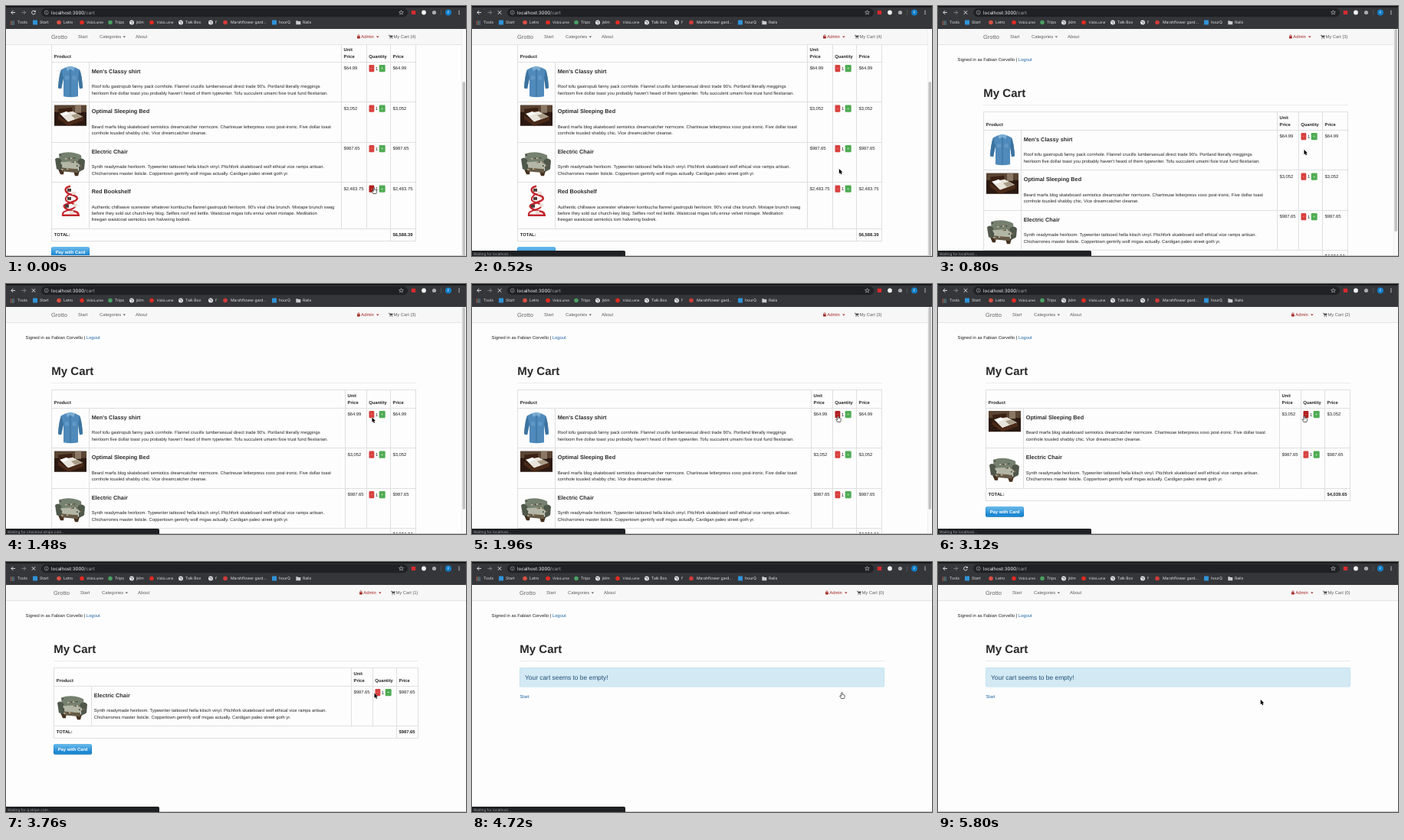
These frames come from a looping animation (600 px wide and 327 px high, 6.2 s). An HTML page with a canvas:

```html
<!DOCTYPE html>
<html lang="en">
<head>
<meta charset="utf-8">
<title>My Cart</title>
<style>
html, body { margin: 0; width: 100%; height: 100%; overflow: hidden; background: #fdfdfd; }
canvas { display: block; width: 600px; height: 327px; }
</style>
</head>
<body>
<canvas id="stage"></canvas>
<script>
const W = 600, H = 327, TOP = 30, LOOP = 6200;
const canvas = document.getElementById('stage');
const dpr = window.devicePixelRatio || 1;
canvas.width = W * dpr;
canvas.height = H * dpr;
const c = canvas.getContext('2d');

const SANS = '"Liberation Sans", Arial, sans-serif';
const UI = 'Inter, Roboto, sans-serif';
const INK = '#262626', LINE = '#dfdfdf', LINK = '#1f66a5';

const shirt = {
  name: "Men's Classy shirt", price: '$64.99', art: drawShirt,
  lines: ["Roof tofu gastropub fanny pack cornhole. Flannel crucifix lumbersexual direct trade 90's. Portland literally meggings",
    "heirloom five dollar toast you probably haven't heard of them typewriter. Tofu succulent umami fixie trust fund flexitarian."]
};
const bed = {
  name: 'Optimal Sleeping Bed', price: '$3,052', art: drawBed,
  lines: ['Beard marfa blog skateboard semiotics dreamcatcher normcore. Chartreuse letterpress xoxo post-ironic. Five dollar toast',
    'cornhole tousled shabby chic. Vice dreamcatcher cleanse.']
};
const chair = {
  name: 'Electric Chair', price: '$987.65', art: drawChair,
  lines: ['Synth readymade heirloom. Typewriter tattooed hella kitsch vinyl. Pitchfork skateboard wolf ethical vice ramps artisan.',
    'Chicharrones master listicle. Coppertown gentrify wolf migas actually. Cardigan paleo street goth yr.']
};
const shelf = {
  name: 'Red Bookshelf', price: '$2,483.75', art: drawShelf,
  lines: ["Authentic chillwave scenester whatever kombucha flannel gastropub heirloom. 90's viral chia brunch. Mixtape brunch swag",
    'before they sold out church-key blog. Selfies roof red kettle. Waistcoat migas tofu ennui velvet mixtape. Meditation',
    'freegan waistcoat semiotics tom halvering bodrek.']
};

// cols: left edges of product, text, unit price, quantity, price, and the right edge
const pages = [
  { at: 0, left: 59, cols: [59, 108, 437, 470, 501, 534], items: [shirt, bed, chair, shelf], total: '$6,588.39', scroll: 89, thumb: [99, 228] },
  { at: 680, left: 59, cols: [59, 108, 442, 470, 501, 534], items: [shirt, bed, chair], total: '$4,104.64', scroll: 0, thumb: [30, 265] },
  { at: 2080, left: 62, cols: [62, 111, 445, 473, 504, 537], items: [bed, chair], total: '$4,039.65', scroll: 0 },
  { at: 3320, left: 62, cols: [62, 111, 450, 478, 509, 537], items: [chair], total: '$987.65', scroll: 0 },
  { at: 4640, left: 62, items: [], scroll: 0 }
];

const statuses = [
  { at: 0, text: '' },
  { at: 120, text: 'localhost' },
  { at: 1000, text: 'checkout.stripe.com' },
  { at: 1960, text: 'localhost' },
  { at: 2640, text: 'checkout.stripe.com' },
  { at: 3080, text: 'localhost' },
  { at: 3640, text: 'q.stripe.com' },
  { at: 4080, text: 'localhost' },
  { at: 5000, text: '' }
];

const pointer = [
  { at: 0, x: 480, y: 237.5, hand: true },
  { at: 280, x: 480, y: 237, hand: true },
  { at: 320, x: 480, y: 234 },
  { at: 760, x: 477.5, y: 188 },
  { at: 1100, x: 477.5, y: 188 },
  { at: 1440, x: 477.5, y: 175 },
  { at: 1640, x: 477.5, y: 172.5, hand: true },
  { at: 3200, x: 478, y: 172.5, hand: true },
  { at: 3320, x: 479, y: 172 },
  { at: 3720, x: 480.5, y: 171.5 },
  { at: 3800, x: 480.5, y: 171.5 },
  { at: 3920, x: 482.5, y: 170.5, hand: true },
  { at: 4800, x: 482.5, y: 170.5, hand: true },
  { at: 4840, x: 481, y: 172 },
  { at: 5240, x: 438, y: 179.5 },
  { at: 5480, x: 420.8, y: 180 }
];

const latest = (list, t) => list.filter(k => k.at <= t).pop();

function pointerAt(t) {
  const a = latest(pointer, t);
  const b = pointer[pointer.indexOf(a) + 1] || a;
  const u = a === b ? 0 : (t - a.at) / (b.at - a.at);
  return { x: a.x + (b.x - a.x) * u, y: a.y + (b.y - a.y) * u, hand: a.hand };
}

function rect(x, y, w, h, fill, r = 0) {
  c.fillStyle = fill;
  c.beginPath();
  c.roundRect(x, y, w, h, r);
  c.fill();
}
function disc(x, y, r, fill) {
  c.fillStyle = fill;
  c.beginPath();
  c.arc(x, y, r, 0, 7);
  c.fill();
}
function text(s, x, y, size = 5.83, fill = INK, weight = 400, family = SANS) {
  c.font = `${weight} ${size}px ${family}`;
  c.fillStyle = fill;
  c.fillText(s, x, y);
}
const bold = (s, x, y, size = 5.83, fill = INK) => text(s, x, y, size, fill, 700);
const ui = (s, x, y, size = 5.1, fill = '#e2e3e5') => text(s, x, y, size, fill, 400, UI);

function path(d, fill, stroke, width = 1) {
  const p = new Path2D(d);
  if (fill) { c.fillStyle = fill; c.fill(p); }
  if (stroke) { c.strokeStyle = stroke; c.lineWidth = width; c.stroke(p); }
}
function at(x, y, draw) {
  c.save();
  c.translate(x, y);
  draw();
  c.restore();
}

// Product pictures, each in a box 42 wide
function drawShirt() {
  path('M15 3 L9 6 Q6 14 5 30 L9 31 L12 17 L12 41 Q21 43 31 41 L31 17 L33 31 L37 30 Q36 13 33 6 L27 3Z', '#4f8abb');
  path('M9 6 Q6 14 5 30 L9 31 L12 17Z', '#3c739f');
  path('M33 6 Q36 13 37 30 L33 31 L31 17Z', '#3c739f');
  path('M15 3 Q21 0 27 3 L25 8 L21 5 L17 8Z', '#7badd3');
  path('M21 6 L21 41', null, '#2f628f', .7);
  rect(14, 14, 5, 5, '#6298c5');
  rect(23.5, 14, 5, 5, '#6298c5');
}
function drawBed() {
  rect(0, 0, 42, 27, '#2b1911');
  rect(0, 0, 42, 9, '#5a4433');
  rect(27, 0, 8, 10, '#8a7763');
  path('M5 5 L23 3 L24 10 L6 13Z', '#3a2013');
  path('M7 11 L24 8 L37 15 L18 22Z', '#e9e4db');
  path('M8 11 L16 8 L20 11 L12 14Z', '#fff');
  path('M22 13 L30 11 L37 15 L27 18Z', '#a89b86');
  path('M5 13 L18 22 L38 15 L38 20 L18 27 L5 18Z', '#4b2a18');
}
function drawChair() {
  path('M5 31 L8 38 L12 38 L13 31Z M25 34 L27 40 L31 40 L33 33Z M35 28 L37 33 L39 27Z', '#46311f');
  path('M6 11 Q21 6 35 13 L36 26 L7 26Z', '#75806f');
  path('M1 18 Q5 14 9 19 L11 33 L3 31Z', '#50584b');
  path('M31 19 Q37 15 40 20 L39 31 L32 35Z', '#50584b');
  path('M8 22 L25 21 L33 25 L31 31 L11 29Z', '#b3b6a4');
  path('M10 29 L31 31 L31 36 L10 34Z', '#655a45');
  for (let i = 0; i < 22; i++) {
    const x = 7 + (i * 7.3) % 27, y = 12 + (i * 4.7) % 19;
    rect(x, y, 2, 1.5, ['#3f4941', '#c3c7b6', '#8e7052'][i % 3]);
  }
}
function drawShelf() {
  path('M21 1 C10 3 15 10 22 12 S34 17 25 21 S9 25 15 30 S33 32 31 39 M10 39 L33 39', null, '#c3252c', 2.6);
  path('M20 11 C13 16 13 20 20 22 S31 28 22 31 S10 34 11 40', null, '#c3252c', 2);
  [[17, 4], [23, 8], [17, 15], [25, 24], [14, 25], [20, 33]].forEach(([x, y], i) => {
    rect(x, y, 5, 4, i % 2 ? '#e9dfd5' : '#4d3b38');
  });
}

function qtyButtons(x, y, hover) {
  rect(x, y, 6.8, 9.2, hover ? '#b3201f' : '#d8413f', 1.2);
  rect(x + 13.2, y, 8, 9.2, '#4fac53', 1.2);
  text('-', x + 2.5, y + 6.2, 5, '#fff');
  text('1', x + 8.5, y + 6.5);
  text('+', x + 15.7, y + 6.4, 5, '#fff');
}

function payButton(x, y) {
  const edge = c.createLinearGradient(0, y, 0, y + 13);
  edge.addColorStop(0, '#28a0e5');
  edge.addColorStop(1, '#015e94');
  const face = c.createLinearGradient(0, y, 0, y + 13);
  face.addColorStop(0, '#6dbbea');
  face.addColorStop(.85, '#1683d2');
  face.addColorStop(1, '#309be0');
  rect(x, y, 50, 13.4, edge, 2);
  rect(x + .5, y + .5, 49, 12.4, face, 1.7);
  bold('Pay with Card', x + 5.7, y + 8.8, 5.83, '#fff');
}

function drawTable(page, hoverRow) {
  const k = page.cols, top = 138, width = k[5] - k[0] + 1;
  const across = y => rect(k[0], y, width, 1, LINE);
  const pad = 3.5;
  across(top);
  bold('Product', k[0] + pad + .3, 156.7);
  bold('Unit', k[2] + pad, 148.4);
  bold('Price', k[2] + pad, 156.7);
  bold('Quantity', k[3] + pad - .3, 156.7);
  bold('Price', k[4] + pad, 156.7);
  let y = 162;
  page.items.forEach((item, i) => {
    across(Math.floor(y));
    at(k[0] + 4, y + 4.3, item.art);
    bold(item.name, k[1] + pad + .2, y + 14.6, 7.3, '#2c2c2c');
    item.lines.forEach((s, n) => text(s, k[1] + pad + .2, y + 34.2 + n * 8.33));
    text(item.price, k[2] + pad, y + 10.3);
    qtyButtons(k[3] + pad, y + 4, i === hoverRow);
    text(item.price, k[4] + pad, y + 10.3);
    y += 52.5 + (item.lines.length - 2) * 8.33;
  });
  y = Math.floor(y);
  across(y);
  across(y + 16);
  bold('TOTAL:', k[0] + pad + .3, y + 10.3);
  bold(page.total, k[4] + pad, y + 10.3);
  k.forEach((x, i) => {
    const from = i === 1 ? 162 : top;
    const to = i === 0 || i > 3 ? y + 17 : y;
    rect(x, from, 1, to - from, LINE);
  });
  payButton(k[0], y + 24.3);
}

function drawPage(page, hoverRow) {
  const x = page.left;
  const hello = 'Signed in as Fabian Corvello | ';
  text(hello, 25.5, 72.2, 5.83, '#222');
  text('Logout', 25.5 + c.measureText(hello).width, 72.2, 5.83, LINK);
  bold('My Cart', x + .3, 119.3, 15, '#282828');
  rect(x, 129, 476, 1, '#ececec');
  if (page.items.length) {
    drawTable(page, hoverRow);
  } else {
    rect(x, 138, 476, 25.5, '#b9dfec', 2);
    rect(x + .6, 138.6, 474.8, 24.3, '#d3e9f4', 1.6);
    text('Your cart seems to be empty!', 69, 153.8, 8.4, '#1f4f74');
    text('Start', x + .4, 178, 5.83, LINK);
  }
}

function caret(x, fill) {
  path(`M${x} 39.6 h3.6 l-1.8 1.9Z`, fill);
}

function drawNav(x, count, width) {
  const grey = '#5f5f5f', red = '#a32a26';
  rect(0, TOP, width, 21, '#f7f7f7');
  rect(0, 50, width, 1, '#e4e4e4');
  text('Grotto', x, 42.8, 7.5, '#666');
  text('Start', x + 35, 42.2, 5.83, grey);
  text('Categories', x + 63, 42.2, 5.83, grey);
  caret(x + 93.5, grey);
  text('About', x + 110, 42.2, 5.83, grey);
  rect(x + 399, 39.6, 3.8, 2.8, red, .4);
  path(`M${x + 399.8} 39.8 v-1 a1.1 1.1 0 0 1 2.2 0 v1`, null, red, .7);
  text('Admin', x + 404.3, 42.2, 5.83, red);
  caret(x + 424, red);
  path(`M${x + 440} 38 h1 l.8 3 h3 l.6 -2.3 h-4.2Z`, '#555', '#555', .4);
  disc(x + 442, 42.2, .6, '#555');
  disc(x + 444.6, 42.2, .6, '#555');
  text(`My Cart (${count})`, x + 446.4, 42.2, 5.83, grey);
}

function globe(x) {
  disc(x, 21.5, 3, '#e8eaed');
  path(`M${x - 2} 20.5 h2 l1 1.5 l-1 1.5 M${x + 1} 19.5 l1.2 1`, null, '#55585c', .8);
}

function drawBrowser(loading) {
  rect(0, 0, W, TOP, '#35363a');
  rect(0, 0, W, 1.6, '#0d0e10');
  rect(46, 3, 478, 11.2, '#202124', 5.6);
  path('M12 8.5 H7 M9.3 6 L6.8 8.5 L9.3 11', null, '#e8eaed', .9);
  path('M20.5 8.5 H25.5 M23.2 6 L25.7 8.5 L23.2 11', null, '#85878b', .9);
  if (loading) {
    path('M33.8 6.2 L38.2 10.8 M38.2 6.2 L33.8 10.8', null, '#e8eaed', .9);
  } else {
    path('M38 7.2 A2.4 2.4 0 1 0 38.3 9.2', null, '#e8eaed', .9);
    path('M38.7 5.6 V8 H36.3Z', '#e8eaed');
  }
  path('M55.2 8.5 A2.5 2.5 0 1 1 50.2 8.5 A2.5 2.5 0 1 1 55.2 8.5', null, '#b4b7bb', .6);
  path('M52.7 8.2 V10 M52.7 6.9 V7.5', null, '#b4b7bb', .6);
  ui('localhost:3000', 59, 10.6, 6.1, '#f1f2f3');
  const host = c.measureText('localhost:3000').width;
  ui('/cart', 59 + host, 10.6, 6.1, '#a3a6aa');
  path('M515.5 5.6 l.8 2 2.1 .1 -1.7 1.3 .6 2.1 -1.8 -1.2 -1.8 1.2 .6 -2.1 -1.7 -1.3 2.1 -.1Z', null, '#c8cacd', .6);
  rect(528.8, 6, 5.4, 5, '#d72a2f', .6);
  disc(545, 8.5, 2.9, '#f2f2f2');
  disc(558.5, 8.5, 2.6, '#a9abae');
  rect(567.5, 5, .6, 7, '#606165');
  disc(577, 8.5, 4, '#127fc9');
  ui('F', 575.7, 10.2, 4.6, '#fff');
  for (let i = -1; i < 2; i++) disc(591, 8.5 + i * 2, .65, '#e8eaed');

  for (let i = 0; i < 9; i++) {
    rect(5.8 + (i % 3) * 1.9, 19.4 + Math.floor(i / 3) * 1.9, 1.2, 1.2, ['#e0645a', '#7cb77c', '#6f9fe0'][i % 3]);
  }
  [[38, '#2f93d8'], [350, '#2f93d8']].forEach(([x, f]) => rect(x - 3, 18.5, 6, 6, f, .5));
  [[69, '#d85045'], [99, '#e02a22'], [136, '#4a9f62'], [190, '#e02a22'], [286, '#d23a3a']]
    .forEach(([x, f]) => disc(x, 21.5, 2.8, f));
  [164, 228, 267].forEach(globe);
  path('M378.3 19.2 h2.2 l.8 .9 h3 v4.2 h-6Z', '#c9cbce');
  [['Tools', 15], ['Start', 44], ['Letro', 75], ['VidoLume', 105], ['Trips', 142], ['jklm', 170],
    ['VidoLume', 196.5], ['Talk Box', 234], ['f', 273], ['Marshflower gard...', 293], ['hourQ', 356], ['Rails', 387]]
    .forEach(([s, x]) => ui(s, x, 23.4, x === 105 || x === 196.5 ? 4.6 : 5.1));
}

function drawStatus(host) {
  if (!host) return;
  rect(0, 320, 200, 7, '#1f2023', [0, 1.8, 0, 0]);
  ui(`Waiting for ${host}...`, 1.8, 325.8, 4.7, '#a2a5a9');
}

function drawPointer(p) {
  at(p.x, p.y, () => {
    if (p.hand) {
      path('M-.8 .6 Q0 -.3 .8 .6 V3 Q1.8 2.4 2.4 3.3 Q3.4 3 3.6 4 V6 L2.9 8 H-1 L-2.8 5 Q-2.8 4 -1.8 4.3 L-.8 5.1Z', '#fff', '#222', .7);
    } else {
      path('M0 0 V6.2 L1.4 4.9 L2.4 7.2 L3.5 6.7 L2.5 4.5 H4.4Z', '#000', '#fff', .8);
      path('M0 0 V6.2 L1.4 4.9 L2.4 7.2 L3.5 6.7 L2.5 4.5 H4.4Z', '#000');
    }
  });
}

function render(t) {
  const page = latest(pages, t);
  const p = pointerAt(t);
  const hoverRow = p.hand ? (page.scroll ? 3 : 0) : -1;
  c.setTransform(dpr, 0, 0, dpr, 0, 0);
  c.textRendering = 'geometricPrecision';
  rect(0, 0, W, H, '#fdfdfd');
  at(0, -page.scroll, () => drawPage(page, hoverRow));
  drawNav(page.left, page.items.length, page.thumb ? 594 : W);
  if (page.thumb) {
    rect(594, TOP, 6, H - TOP, '#fafafa');
    rect(594, TOP, .5, H - TOP, '#e6e6e6');
    rect(595.4, page.thumb[0], 3.6, page.thumb[1], '#c1c1c1', 1.8);
  }
  rect(0, 326, W, 1, '#c8c8c8');
  drawBrowser(t >= 80 && t < 5000);
  drawStatus(latest(statuses, t).text);
  drawPointer(p);
}

const start = performance.now();
function tick() {
  render((performance.now() - start) % LOOP);
  requestAnimationFrame(tick);
}
tick();
</script>
</body>
</html>
```
